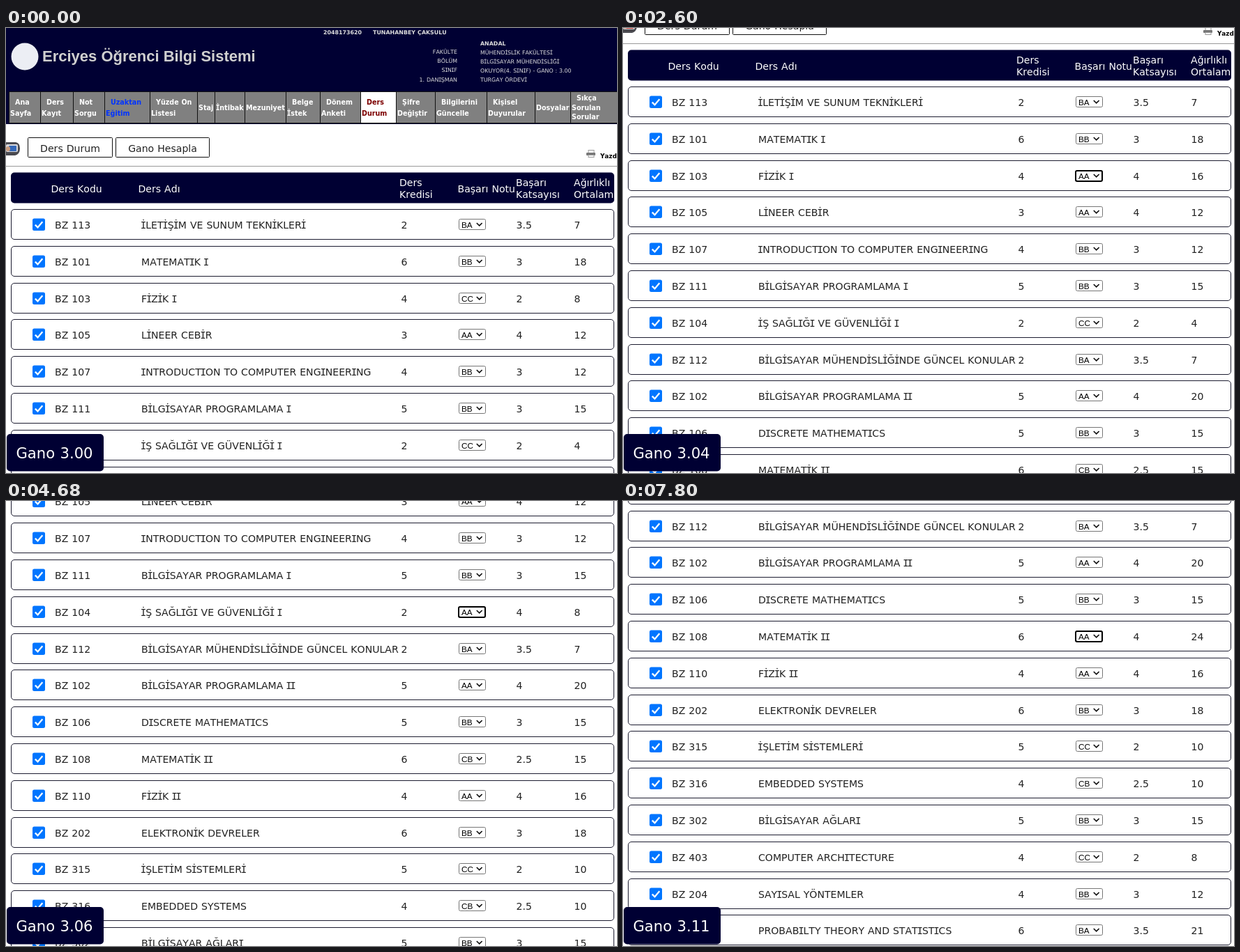
An HTML page that plays this animation: 876x639 px, repeating every 8 s.

```html
<!DOCTYPE html>
<html lang="tr">
<head>
<meta charset="utf-8">
<title>Gano Hesapla</title>
<style>
html, body { margin: 0; width: 100%; height: 100%; overflow: hidden; background: #fff; }
svg { display: block; width: 100%; height: 100%; }
text { font: 14.08px 'DejaVu Sans', sans-serif; font-kerning: none; word-spacing: .034em; fill: #222; white-space: pre; }
text.bold { font-weight: bold; }
text.arial { font-family: 'Liberation Sans', Arial, sans-serif; word-spacing: 0; }
.cap { font-family: 'DejaVu Sans Mono', monospace; }
</style>
</head>
<body>
<svg id="stage" viewBox="0 0 876 639"></svg>
<script>
const LOOP = 8000, NAVY = '#000033';
const COEF = { AA: 4, BA: 3.5, BB: 3, CB: 2.5, CC: 2, DC: 1.5, DD: 1, FD: 0.5, FF: 0 };
const GRADES = Object.keys(COEF);

const COURSES = `113|İLETİŞİM VE SUNUM TEKNİKLERİ|2|BA
101|MATEMATIK I|6|BB
103|FİZİK I|4|CC
105|LİNEER CEBİR|3|AA
107|INTRODUCTION TO COMPUTER ENGINEERING|4|BB
111|BİLGİSAYAR PROGRAMLAMA I|5|BB
104|İŞ SAĞLIĞI VE GÜVENLİĞİ I|2|CC
112|BİLGİSAYAR MÜHENDİSLİĞİNDE GÜNCEL KONULAR|2|BA
102|BİLGİSAYAR PROGRAMLAMA II|5|AA
106|DISCRETE MATHEMATICS|5|BB
108|MATEMATİK II|6|CB
110|FİZİK II|4|AA
202|ELEKTRONİK DEVRELER|6|BB
315|İŞLETİM SİSTEMLERİ|5|CC
316|EMBEDDED SYSTEMS|4|CB
302|BİLGİSAYAR AĞLARI|5|BB
403|COMPUTER ARCHITECTURE|4|CC
204|SAYISAL YÖNTEMLER|4|BB
206|PROBABILTY THEORY AND STATISTICS|6|BA`.split('\n').map(line => line.split('|'));

const NAV = [
  [4, 'Ana', 'Sayfa'], [49, 'Ders', 'Kayıt'], [96, 'Not', 'Sorgu'], [141, 'Uzaktan', 'Eğitim'],
  [206, 'Yüzde On', 'Listesi'], [274, 'Staj'], [299, 'İntibak'], [342, 'Mezuniyet'],
  [401, 'Belge', 'İstek'], [450, 'Dönem', 'Anketi'], [508, 'Ders', 'Durum'], [559, 'Şifre', 'Değiştir'],
  [615, 'Bilgilerini', 'Güncelle'], [689, 'Kişisel', 'Duyurular'], [758, 'Dosyalar'],
  [809, 'Sıkça', 'Sorulan', 'Sorular']
];

// Scroll position from each time on
const SCROLL = [[0, 0], [1950, 50], [2080, 140], [2210, 176], [4420, 264], [4550, 396], [4680, 440], [7670, 540], [7800, 616]];

// Each pick opens a list, hovers options, then sets AA and keeps focus until blur
const PICKS = [
  { row: 2, hover: [[910, 'CC'], [1040, 'BB'], [1170, 'AA']], close: 1690, blur: 2730, gano: '3.04' },
  { row: 6, hover: [[3120, 'CC'], [3510, 'BB'], [3640, 'BA'], [3770, 'AA']], close: 3900, blur: 5590, gano: '3.06' },
  { row: 10, hover: [[6500, 'CB'], [6630, 'BB'], [6760, 'AA']], close: 7280, blur: LOOP, gano: '3.11' }
];

const at = (keys, t) => keys.reduce((v, [time, next]) => t >= time ? next : v, null);
const rowTop = i => Math.round(260 + i * 52.8);

// Capital I gets serifs
function serifed(str, bold) {
  const trim = bold ? 0.028 : 0.082;
  return str.replace(/[Iİ]/g, c => `<tspan class="cap" dx="-${trim}em" letter-spacing="-${trim}em">${c}</tspan>`);
}

function text(x, y, str, { size = 14.08, fill = '#222', bold = false, arial = false, anchor = 'start', id = '' } = {}) {
  const cls = [bold && 'bold', arial && 'arial'].filter(Boolean).join(' ');
  return `<text ${id && `id="${id}"`} class="${cls}" x="${x}" y="${y}" text-anchor="${anchor}" style="font-size:${size}px;fill:${fill}">${arial ? str : serifed(str, bold)}</text>`;
}

function rect(x, y, w, h, fill, extra = '') {
  return `<rect x="${x}" y="${y}" width="${w}" height="${h}" fill="${fill}" ${extra}/>`;
}

function banner() {
  const small = { size: 7.92, fill: '#ddd' };
  const labels = ['FAKÜLTE', 'BÖLÜM', 'SINIF', '1. DANIŞMAN'];
  const values = ['MÜHENDİSLİK FAKÜLTESİ', 'BİLGİSAYAR MÜHENDİSLİĞİ', 'OKUYOR(4. SINIF) - GANO : 3.00', 'TURGAY ÖRDEVİ'];
  return rect(0, 0, 876, 138, NAVY) +
    '<circle cx="27" cy="41" r="19.5" fill="#eceef4"/>' +
    text(52, 48, 'Erciyes Öğrenci Bilgi Sistemi', { size: 22, fill: '#d0d0d0', bold: true, arial: true }) +
    text(455, 9, '2048173620', { ...small, bold: true }) +
    text(526, 9, 'TUNAHANBEY ÇAKSULU', { ...small, bold: true }) +
    text(680, 24.5, 'ANADAL', { ...small, bold: true }) +
    labels.map((s, i) => text(647, 37 + i * 13.2, s, { ...small, anchor: 'end' })).join('') +
    values.map((s, i) => text(680, 37.5 + i * 13.2, s, small)).join('');
}

function navCell([x, ...lines], i) {
  const right = i + 1 < NAV.length ? NAV[i + 1][0] : 877;
  const active = i === 10, n = lines.length;
  const top = [0, 117.5, 109.5, 104][n], gap = n === 3 ? 13.7 : 16;
  return rect(x + 0.5, 91.5, right - x, 45, active ? '#fff' : '#808080', 'stroke="#111"') +
    `<g id="nav${i}">` + lines.map((s, k) =>
      text(x + 2 + (n > 1 && k === 0 ? 7 : 0), top + k * gap, s, { size: 9.6, fill: 'inherit', bold: true })).join('') + '</g>';
}

function toolbar() {
  const button = (x, w, s) => rect(x + 0.5, 157.5, w, 28, '#fff', 'stroke="#111" rx="1"') +
    text(x + 0.5 + w / 2, 177.5, s, { anchor: 'middle' });
  return '<path d="M0 164h14q6 1 6 9t-7 10H0z" fill="#4a4a50"/>' +
    rect(0, 167, 17, 11, '#d8d8dc', 'rx="2"') + rect(4, 169, 11, 8, '#3468b8', 'id="badge" rx="1"') +
    rect(0, 170, 6, 7, '#c89a7c', 'rx="3"') +
    button(31, 121, 'Ders Durum') + button(157, 134, 'Gano Hesapla') +
    rect(835, 175.5, 8, 4, '#fff', 'stroke="#999"') + rect(832, 179, 13, 4, '#777', 'rx="1"') +
    rect(835, 182.5, 8, 3, '#fff', 'stroke="#999"') +
    text(852, 187, 'Yazdır', { size: 8.8, fill: '#000', bold: true }) +
    rect(0, 198, 876, 1, '#999');
}

function tableHead() {
  const head = (x, a, b) => b
    ? text(x, 227, a, { fill: '#fff' }) + text(x, 243.5, b, { fill: '#fff' })
    : text(x, 235.5, a, { fill: '#fff' });
  return rect(7, 207.5, 865, 44, NAVY, 'rx="5"') +
    head(64.5, 'Ders Kodu') + head(189.5, 'Ders Adı') + head(564, 'Ders', 'Kredisi') +
    head(647.5, 'Başarı Notu') + head(731, 'Başarı', 'Katsayısı') + head(814, 'Ağırlıklı', 'Ortalama');
}

function courseRow([code, name, credit], i) {
  return `<g transform="translate(0 ${rowTop(i)})">` +
    rect(7.5, 0.5, 864, 43, '#fff', 'stroke="#1c1c30" rx="4.5"') +
    rect(38, 13.5, 18, 17.5, '#0075ff', 'rx="2.5"') +
    '<path d="M41.8 22.6l3.7 3.8 6.8-8.2" fill="none" stroke="#fff" stroke-width="2.3"/>' +
    text(70, 28, 'BZ ' + code) + text(194, 28, name) + text(566.5, 28, credit) +
    rect(649.5, 14.5, 38, 15, '#fff', 'stroke="#767676" rx="2"') +
    text(653, 26.5, '', { size: 11.73, fill: '#000', arial: true, id: 'grade' + i }) +
    '<path d="M674.8 20l3.9 3.9 3.9-3.9" fill="none" stroke="#111" stroke-width="1.7"/>' +
    text(731.5, 28, '', { id: 'coef' + i }) + text(814.5, 28, '', { id: 'sum' + i }) + '</g>';
}

function popup() {
  return '<g id="popup">' + rect(0.5, 0.5, 38, 133, '#fff', 'stroke="#777"') +
    rect(1, 0, 37, 15, '#1a86e8', 'id="mark"') +
    GRADES.map((g, i) => text(4, 11.8 + i * 14.6, g, { size: 12, arial: true, id: 'opt' + g })).join('') + '</g>';
}

const stage = document.getElementById('stage');
stage.innerHTML = '<g id="page">' + banner() + NAV.map(navCell).join('') + toolbar() + tableHead() +
  COURSES.map(courseRow).join('') +
  rect(649, 15, 38, 15, 'none', 'id="ring" stroke="#000" stroke-width="2" rx="2"') + '</g>' + popup() +
  rect(1, 583, 139, 53.5, NAVY, 'rx="5"') + text(14.5, 617.5, '', { size: 21.12, fill: '#fff', id: 'gano' });

const $ = id => document.getElementById(id);
const set = (id, attrs) => { for (const k in attrs) $(id).setAttribute(k, attrs[k]); };
const write = (id, s) => { if ($(id).textContent !== s) $(id).textContent = s; };
const show = (id, on) => set(id, { visibility: on ? 'visible' : 'hidden' });
const tint = (i, color) => $('nav' + i).querySelectorAll('text').forEach(el => el.style.fill = color);
NAV.forEach((_, i) => tint(i, '#fff'));

function draw(t) {
  const scroll = at(SCROLL, t);
  set('page', { transform: `translate(0 ${-scroll})` });

  const lit = t >= 780;
  tint(3, lit ? '#0040d8' : '#0033ff');
  tint(10, lit ? '#c00000' : '#7c0000');
  set('badge', { fill: lit ? '#c83a34' : '#3468b8' });

  COURSES.forEach(([, , credit, start], i) => {
    const pick = PICKS.find(p => p.row === i);
    const grade = pick && t >= pick.close ? 'AA' : start;
    write('grade' + i, grade);
    write('coef' + i, String(COEF[grade]));
    write('sum' + i, String(credit * COEF[grade]));
  });

  const focused = PICKS.find(p => t >= p.close && t < p.blur);
  show('ring', focused);
  if (focused) set('ring', { transform: `translate(0 ${rowTop(focused.row)})` });

  const open = PICKS.find(p => t >= p.hover[0][0] && t < p.close);
  show('popup', open);
  if (open) {
    const hovered = at(open.hover, t);
    set('popup', { transform: `translate(656 ${rowTop(open.row) + 132 - scroll})` });
    set('mark', { y: GRADES.indexOf(hovered) * 14.6 });
    GRADES.forEach(g => $('opt' + g).style.fill = g === hovered ? '#fff' : '#222');
  }
  write('gano', 'Gano ' + PICKS.reduce((v, p) => t >= p.close ? p.gano : v, '3.00'));
}

const began = performance.now();
function tick() {
  draw((performance.now() - began) % LOOP);
  requestAnimationFrame(tick);
}
tick();
</script>
</body>
</html>
```
